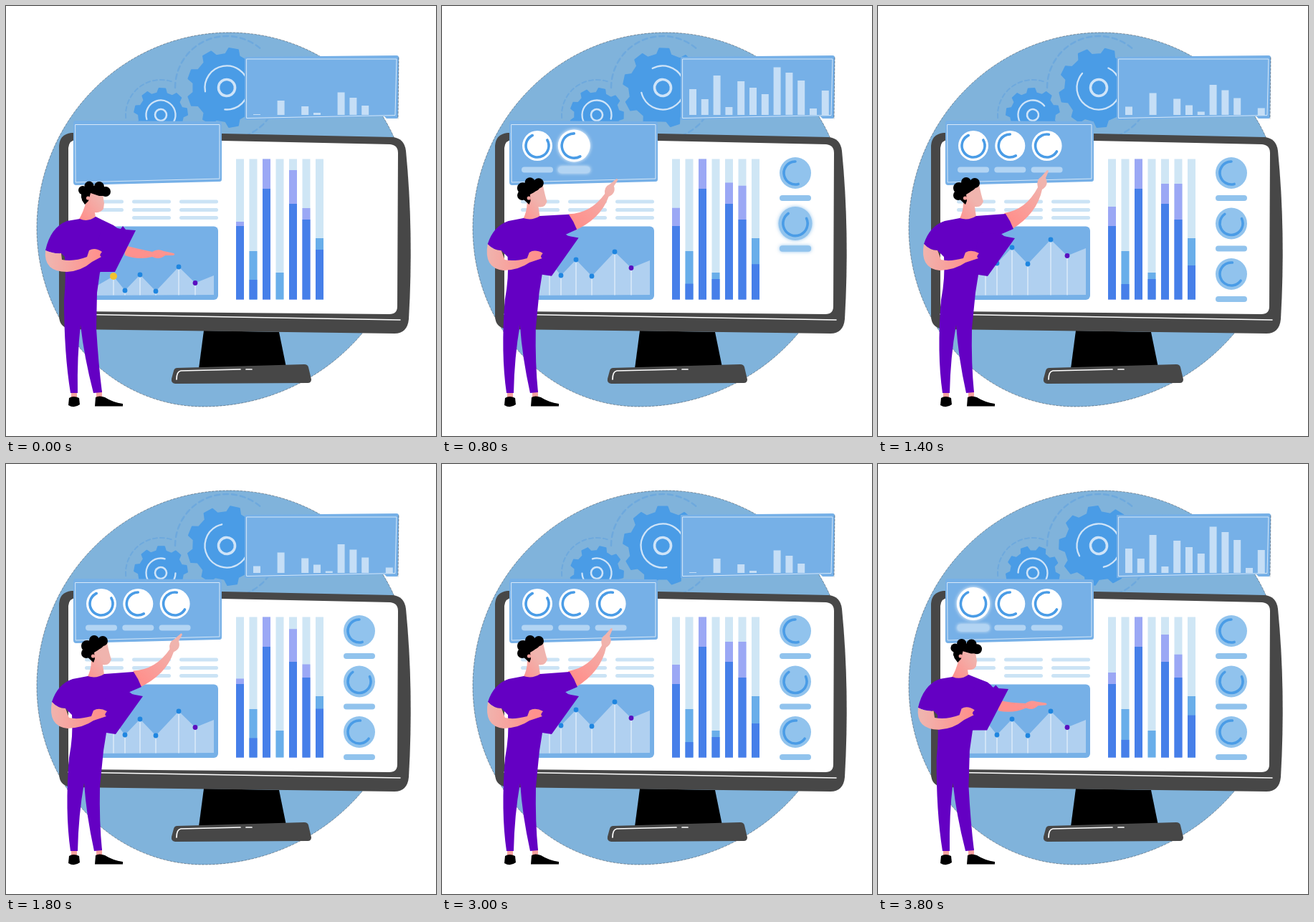
Recreate the animation shown at these times as an HTML page with a canvas. Size 600x600 px, loop 4000 ms.

```html
<!DOCTYPE html>
<html lang="en">
<head>
<meta charset="utf-8">
<title>Dashboard presentation</title>
<style>
html, body { margin: 0; height: 100%; overflow: hidden; background: #fff; }
canvas { display: block; width: 100vw; height: 100vh; }
</style>
</head>
<body>
<canvas id="stage" width="600" height="600"></canvas>
<script>
const c = document.getElementById('stage').getContext('2d');
const TAU = Math.PI * 2, DEG = Math.PI / 180;
const STEP = 200, STEPS = 20, CYCLE = 7.7;
const PANEL = '#76b0e7', GEAR = '#4a9ce6', DARK = '#474747', PURPLE = '#6400c3';

// Piecewise linear value through [x, y] points
function at(x, points) {
  for (let i = 1; i < points.length; i++) {
    const [x0, y0] = points[i - 1], [x1, y1] = points[i];
    if (x <= x1) return y0 + (y1 - y0) * (x - x0) / (x1 - x0);
  }
  return points[points.length - 1][1];
}

// Blend two path strings of the same structure
function mix(a, b, m) {
  const to = b.match(/-?\d+(\.\d+)?/g);
  let i = 0;
  return a.replace(/-?\d+(\.\d+)?/g, n => +n + (to[i++] - n) * m);
}

function fill(path, color) {
  c.fillStyle = color;
  c.fill(new Path2D(path));
}

function line(path, color, width, dash = []) {
  c.strokeStyle = color;
  c.lineWidth = width;
  c.setLineDash(dash);
  c.stroke(new Path2D(path));
  c.setLineDash([]);
}

function rect(x, y, w, h, color, r = 0) {
  c.fillStyle = color;
  c.beginPath();
  c.roundRect(x, y, w, h, r);
  c.fill();
}

function disc(x, y, r, color) {
  c.fillStyle = color;
  c.beginPath();
  c.arc(x, y, r, 0, TAU);
  c.fill();
}

function arc(x, y, r, from, to, color, width, dash = []) {
  c.strokeStyle = color;
  c.lineWidth = width;
  c.setLineDash(dash);
  c.beginPath();
  c.arc(x, y, r, from * DEG, to * DEG);
  c.stroke();
  c.setLineDash([]);
}

function skin(x0, y0, x1, y1) {
  const g = c.createLinearGradient(x0, y0, x1, y1);
  g.addColorStop(0, '#f0b4ae');
  g.addColorStop(1, '#ff918d');
  return g;
}

function gear(x, y, outer, inner, turn, arcR, hubR, hubW) {
  const teeth = 9, pitch = TAU / teeth;
  c.save();
  c.translate(x, y);
  c.rotate(turn * DEG);
  c.fillStyle = c.strokeStyle = GEAR;
  c.lineWidth = 2;
  c.lineJoin = 'round';
  c.beginPath();
  for (let i = 0; i < teeth; i++) {
    for (const [a, r] of [[-.3, inner], [-.17, outer], [.17, outer], [.3, inner]]) {
      const t = (i + a) * pitch - TAU / 4;
      c.lineTo(r * Math.cos(t), r * Math.sin(t));
    }
  }
  c.closePath();
  c.fill();
  c.stroke();
  arc(0, 0, arcR, 160, 445, '#cfe4f8', 2.3);
  arc(0, 0, hubR, 0, 360, '#cfe4f8', hubW);
  c.restore();
}

function backdrop(k) {
  const blob = 'M312 37A250 243 0 0 1 562 280A287 279 0 0 1 275 559A232 249 0 0 1 43 310A269 273 0 0 1 312 37Z';
  fill(blob, '#80b3db');
  line(blob, 'rgba(20,35,50,.6)', .7, [3, 2]);
  arc(308, 114, 72, 180, 312, '#6ea9dd', 2.5, [7, 5]);
  arc(308, 114, 72, 35, 80, '#6ea9dd', 2.5, [7, 5]);
  arc(216, 152, 49, 175, 292, '#6ea9dd', 2, [6, 4]);
  gear(308, 114, 55, 47, 10 + 18 * k, 30.5, 11.5, 3.6);
  gear(216, 152, 37, 31, 3 - 18 * k, 20.5, 8, 2.6);
}

function monitor() {
  fill('M276 453L381 455L391 504L269 506Z', '#000');
  fill('M239 505L416 500Q421 500 422 504L426 521Q426 526 421 526L236 527Q230 526 231 520L234 509Q235 505 239 505Z', DARK);
  line('M238 521Q238 510 244 509L327 507M335 507L343 507', '#fff', 1.7);
  fill('M91 177L302 178L540 183Q556 185 558 202Q569 315 562 437Q560 457 542 457L91 451Q74 449 74 432L74 195Q75 179 91 177Z', DARK);
  fill('M98 187L302 188L536 193Q547 194 547 205L546 419Q546 430 535 430L98 426Q87 425 87 415L87 198Q88 187 98 187Z', '#fff');
  line('M87 430L550 438', '#fff', 1.6);
}

function textRows() {
  [110, 176, 242].forEach((x, col) => {
    for (const y of col ? [273, 284.5, 295.5] : [273, 284.5])
      rect(x, y - 2.5, 54, 5, '#cbe3f5', 2.5);
  });
}

function areaChart(k) {
  const rise = at(k, [[0, 0], [4, 21], [7, 38], [9, 19], [12, 2], [15, 32], [16, 36], [19, 19]]);
  const points = [[150, 377], [166, 397], [187, 375], [209, 398], [241, 364], [264, 386.5]]
    .map(([x, y]) => [x, y - rise]);
  rect(100, 307.5, 196, 102.5, PANEL, 6);
  const top = [[110, 400 - rise], ...points, [290, 376 - rise]].join('L');
  fill(`M110 404L${top}L290 403Z`, '#b0d0f0');
  points.forEach(([x, y], i) => {
    line(`M${x} ${y}L${x} 403`, '#e6f1fb', 1.2);
    disc(x, y, i ? 3.4 : 5, i == 0 ? '#f2c230' : i == 5 ? '#5a0fc0' : '#1f86e0');
  });
}

function stackedBars(u) {
  const pale = '#cfe6f5', sky = '#69aeea', lilac = '#9ba8f5', blue = '#467fe9';
  const bars = [
    [lilac, 301 - 21 * u, 307],
    [sky, 342, 382 + 6 * u],
    [lilac, 213.5, 255],
    [sky, 372, u > .7 ? 381 : 409.5],
    [lilac, 229 + 19 * u, 276],
    [lilac, 282 - 34 * u, 298],
    [sky, 324, 340 + 22 * u]
  ];
  bars.forEach(([color, mid, low], i) => {
    const x = 321 + 18.5 * i;
    rect(x, 213.5, 11, 196, pale);
    rect(x, mid, 11, 409.5 - mid, color);
    rect(x, low, 11, 409.5 - low, blue);
  });
}

function dial(x, y, r, face, from, to, pop, barY, barColor) {
  if (!pop) return;
  c.save();
  if (pop > 1) {
    c.shadowColor = face;
    c.shadowBlur = 5;
  }
  disc(x, y, r * pop, face);
  rect(x - 21 - pop, barY - 4 * pop, 42 + 2 * pop, 8 * pop, barColor, 4);
  c.restore();
  arc(x, y, 16 * pop, from, to, GEAR, 3.6);
}

function popAt(k, start) {
  return k < start ? 0 : k == start ? 1.07 : 1;
}

function sideDials(k) {
  const sweeps = [[75, 270], [-25, 235], [35, 275]], starts = [2, 4, 5];
  sweeps.forEach(([from, to], i) => {
    const y = 233 + 70.5 * i;
    dial(493, y, 22, '#91c3ed', from, to, popAt(k, starts[i]), y + 35, '#91c3ed');
  });
}

function leftCard(k) {
  fill('M97 160L298 161Q301 161 301 164L301 242Q301 245 298 245L98 250Q94 250 94 246L94 164Q94 160 97 160Z', PANEL);
  line('M97 165.5L298 165.5L298 241L97.5 246Z', '#d6e8f8', 1);
  const sweeps = [[-30, 245], [60, 270], [30, 280]], starts = [2, 4, 5];
  sweeps.forEach(([from, to], i) => {
    const pop = k == 19 && i == 0 ? 1.1 : popAt(k, starts[i]);
    dial(133 + 51.3 * i, 195, 21, '#fff', from, to, pop, 228.5, '#b2d4f3');
  });
}

function rightCard(drop) {
  fill('M333 71L545 69Q548 69 548 72L547 155Q547 157 544 157L531 157L528 154L333 159Z', PANEL);
  line('M548 72L547 157', 'rgba(20,35,50,.6)', .8, [3, 2]);
  line('M336 74L545 74L543 152.5L336 156.5Z', '#d6e8f8', 1);
  [38, 24, 57, 13, 49, 40, 31, 68.5, 61, 50, 11, 36].forEach((full, i) => {
    const h = full - drop;
    if (h > 0) rect(345 + 16.8 * i, 152 - h, 10, h, '#c5def6');
  });
}

function man(m, swing) {
  const blend = (a, b) => mix(a, b, m);

  // Pointing arm and its sleeve
  c.save();
  c.translate(180, 300);
  c.rotate(swing * DEG);
  c.translate(-180, -300);
  fill(blend(
    'M165 334Q185 339 204 343Q212 338 220 342L234 345Q237 347 233 348L222 348Q214 355 204 350Q185 355 166 348Z',
    'M176 289Q207 284 223 253Q220 243 228 238L236 229Q239 229 237 233L234 240Q239 250 229 256Q222 290 186 312Z'
  ), skin(232, 250, 190, 300 + 40 * (1 - m)));
  c.restore();
  fill(blend(
    'M125 294L150 306Q160 312 168 330L150 350L125 330Z',
    'M137 293L178 290Q185 300 189 311L168 320L137 330Z'
  ), PURPLE);

  // Ankles and shoes
  rect(91, 536, 8, 12, '#f5a39f');
  rect(126, 536, 8, 12, '#f5a39f');
  fill('M88 547Q94 543 102 547L103 556Q95 562 87 557Z', '#000');
  fill('M125 546Q130 543 138 546Q149 553 163 555L163 558.5L124 558.5Z', '#000');

  // Neck and face
  fill(blend(
    'M112 256L135 260Q136 270 137 275L136 283Q132 289 124 288L125 295Q115 305 101 299Q108 288 112 272Z',
    'M120 254L141 249Q144 264 147 273L144 278Q141 281 135 280L137 294Q126 302 113 298Q119 288 119 274Z'
  ), skin(134, 270, 106, 296));

  // Shirt and trousers
  fill(blend(
    'M103 297Q114 302 125 294L150 308L160 320L131 372L127 400L126 450Q129 500 134 539L122 540Q109 490 104 445Q99 490 100 540L90 540Q81 485 81 410Q84 380 82 350L77 345Q66 346 55 341Q62 309 85 300Z',
    'M114 296Q126 300 137 293L152 293L172 318L140 375L136 400L131 450Q130 500 134 539L123 540Q112 490 109 445Q101 490 100 540L90 540Q82 485 88 410Q94 380 92 350L83 341Q72 341 64 332Q72 307 93 300Z'
  ), PURPLE);

  // Folder
  fill(blend(
    'M135 305L160 311L163 307L167 312L181 313L152 371L131 371L125 340Z',
    'M140 316L172 318L176 321L180 322L191 324L153 377L140 375L136 350Z'
  ), PURPLE);

  // Holding arm
  fill(blend(
    'M55 341Q52 371 85 371Q105 370 120 357L133 350Q129 348 134 343Q124 336 116 341L113 350Q95 357 78 354L77 345Q66 346 55 341Z',
    'M64 332Q58 366 86 369Q108 368 122 358L140 352Q136 350 141 345Q130 339 122 344L119 352Q100 357 88 354L83 341Q72 341 64 332Z'
  ), skin(62, 345, 128, 352));

  // Hair
  fill(blend(
    'M104 255L118 250L138 254L142 265L130 265L118 261L115 272L110 277L106 271Z',
    'M108 254L123 246L138 248L136 254L128 260L123 263L124 272L122 277L110 266Z'
  ), '#000');
  const curls = [
    [107, 257, 6, 113, 254, 8], [116, 251, 6.5, 123, 246, 7], [130, 252, 7, 135, 247, 7],
    [139, 259, 7, 129, 251, 7], [109, 266, 4, 112, 264, 7]
  ];
  for (const [ax, ay, ar, bx, by, br] of curls)
    disc(ax + (bx - ax) * m, ay + (by - ay) * m, ar + (br - ar) * m, '#000');
  disc(114.5 + 7 * m, 268, 2.6, '#f5a39f');
}

function draw(k) {
  const phase = k % CYCLE;
  const drop = at(phase, [[0, 37], [1.3, 28.5], [3.6, 4], [4, 2], [4.3, 0], [7, 26.5], [7.3, 37], [CYCLE, 37]]);
  const fillUp = at(phase, [[0, 0], [1.3, .07], [3.6, .48], [4, .92], [4.3, .96], [7, 1], [CYCLE, 1]]);
  const pose = at(k, [[0, 0], [1, .12], [2, .45], [3, .8], [4, .96], [5, 1], [16, 1], [17, .75], [18, .3], [19, .1]]);
  const swing = at(k, [[0, 0], [2, 0], [4, 7], [5, 3], [7, 0], [9, 7], [11, 1], [12, 0]]);

  c.fillStyle = '#fff';
  c.fillRect(0, 0, 600, 600);
  backdrop(k);
  monitor();
  textRows();
  areaChart(k);
  stackedBars(fillUp);
  sideDials(k);
  leftCard(k);
  rightCard(drop);
  man(pose, swing);
}

function tick() {
  draw(Math.floor(performance.now() / STEP) % STEPS);
  requestAnimationFrame(tick);
}
c.lineCap = 'round';
tick();
</script>
</body>
</html>
```
